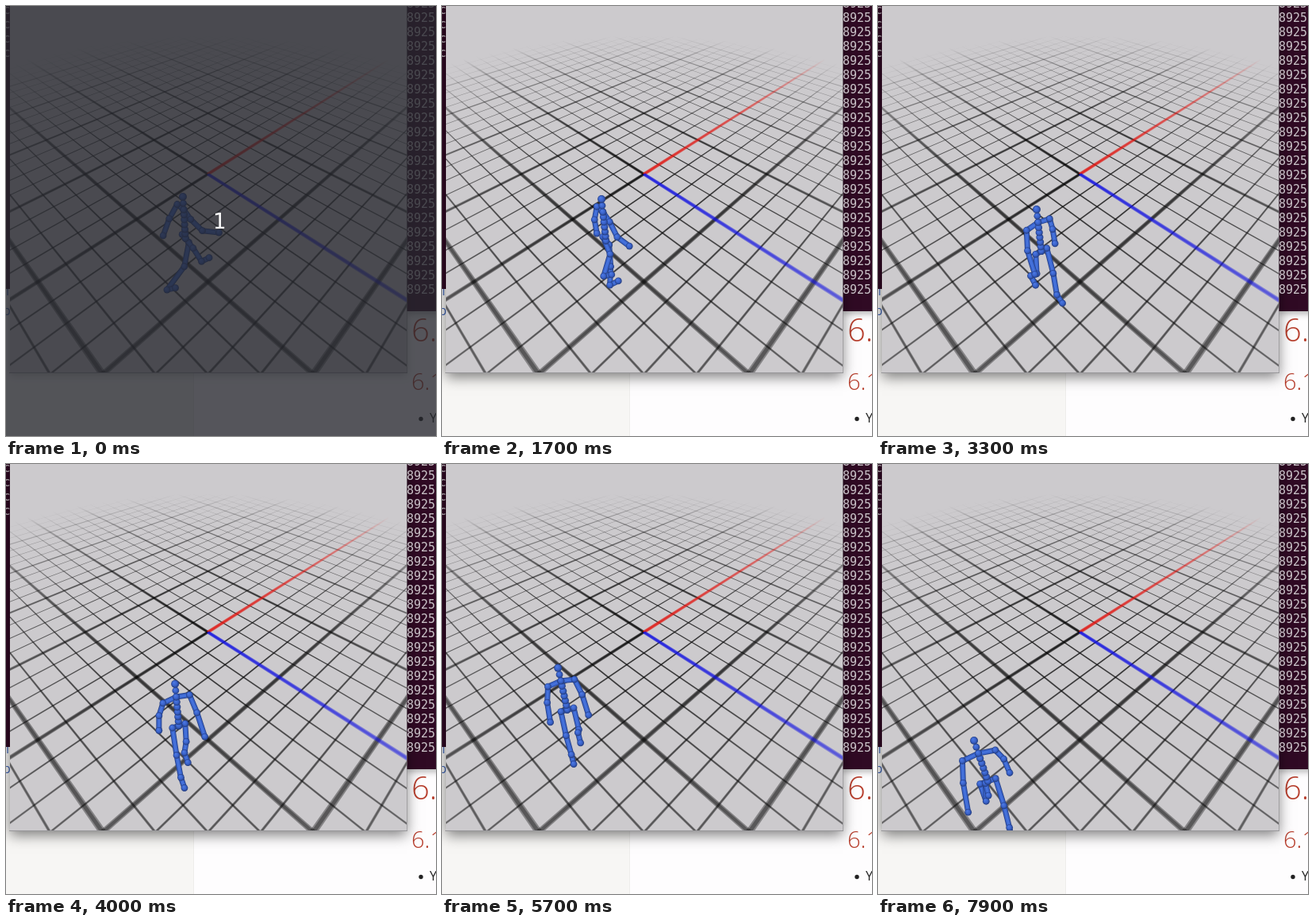
Write an HTML page with a canvas that moves like this. It is 542 px wide and 541 px high and loops after 8000 ms.

```html
<!DOCTYPE html>
<html>
<head>
<meta charset="utf-8">
<title>Walking skeleton viewer</title>
<style>
html, body { margin: 0; width: 100%; height: 100%; overflow: hidden; }
canvas { display: block; }
</style>
</head>
<body>
<canvas id="stage" width="542" height="541"></canvas>
<script>
const W = 542, H = 541, LOOP = 8000, STEP = 100;
const { PI, sin, cos, hypot, max, min, sqrt, SQRT2 } = Math;
const ctx = document.getElementById('stage').getContext('2d');

// World: s to the right, d towards the viewer, h up from the floor.
function project(s, d, h = 0) {
  const k = 1 / (7.19 - d - 1.154 * h);
  return [254.5 + 556 * s * k, 211.5 + (351.6 * d - 609 * h) * k];
}

// Floor axes run diagonally: u to the lower left, v to the lower right.
const floorPoint = (u, v) => project(v - u, u + v);

function floorLine(g, alongV, c, from, to, width, rgb) {
  const reach = sqrt(max(0, 25 - c * c));
  from = max(from, -reach);
  to = min(to, reach, 3.8 - c);
  if (to <= from) return;
  const at = (t, shift) => alongV ? floorPoint(c + shift, t) : floorPoint(t, c + shift);
  const a = at(from, 0), b = at(to, 0);
  const distance = p => hypot(p[0] - a[0], p[1] - a[1]);
  // A wide faint band under a narrow one gives the line its soft edge.
  for (const spread of [1.4, .8]) {
    const fade = g.createLinearGradient(...a, ...b);
    for (let i = 0; i <= 16; i++) {
      const t = from + (to - from) * i / 16;
      const alpha = .65 * max(0, 1 - hypot(c, t) / 5);
      fade.addColorStop(min(1, distance(at(t, 0)) / distance(b)), `rgba(${rgb},${alpha})`);
    }
    const half = width * spread / 2;
    g.fillStyle = fade;
    g.beginPath();
    [at(from, -half), at(to, -half), at(to, half), at(from, half)].forEach(p => g.lineTo(...p));
    g.fill();
  }
}

function drawFloor(g) {
  for (const major of [false, true]) {
    for (let i = -20; i <= 20; i++) {
      if (i === 0 || (i % 4 === 0) !== major) continue;
      for (const alongV of [true, false]) {
        floorLine(g, alongV, i / 4, -5, 5, major ? .03 : .012, '10,10,10');
      }
    }
  }
  floorLine(g, false, 0, 0, 5, .03, '0,0,0');
  floorLine(g, true, 0, -5, 0, .03, '0,0,0');
  floorLine(g, false, 0, -5, 0, .034, '225,20,15');
  floorLine(g, true, 0, 0, 5, .034, '15,15,225');
}

function label(g, text, x, y, font, color) {
  g.font = font;
  g.fillStyle = color;
  g.fillText(text, x, y);
}

function box(g, x, y, w, h, color) {
  g.fillStyle = color;
  g.fillRect(x, y, w, h);
}

function shadowed(g, blur, drop, alpha, draw) {
  g.save();
  g.shadowColor = `rgba(0,0,0,${alpha})`;
  g.shadowBlur = blur;
  g.shadowOffsetY = drop;
  draw();
  g.restore();
}

function clipToView(g, draw) {
  g.save();
  g.beginPath();
  g.rect(5, 0, 500, 461);
  g.clip();
  draw();
  g.restore();
}

function makeScene(focused) {
  const canvas = document.createElement('canvas');
  canvas.width = W;
  canvas.height = H;
  const g = canvas.getContext('2d');
  const mono = '15px "DejaVu Sans Mono", monospace', sans = '"Open Sans", sans-serif';
  const purple = '#300a24', pale = '#c9c2c7', red = '#b8402f', blue = '#3c62b4';
  box(g, 0, 0, W, H, '#fefdfe');
  box(g, 0, 356, 236, 185, '#f7f6f4');
  box(g, 236, 356, 1, 185, '#eeedeb');
  label(g, 'l', 0, 364, '16px ' + sans, blue);
  label(g, 'p', -4, 389, '16px ' + sans, blue);
  label(g, '6.', 511, 422, '300 40px ' + sans, red);
  label(g, '6.1', 511, 483, '300 29px ' + sans, red);
  label(g, 'Y', 534, 524, '16px ' + sans, '#222');
  g.beginPath();
  g.arc(523, 519.5, 2.7, 0, 7);
  g.fill();

  box(g, 0, 0, 6, 356, purple);
  shadowed(g, 8, 3, .3, () => box(g, 504, 0, 60, 384, purple));
  for (let i = 0; i < 4; i++) label(g, 'c', -3.5, 10 + 18 * i, mono, pale);
  if (focused) shadowed(g, 16, 6, .5, () => box(g, 5, -20, 500, 481, '#000'));
  else shadowed(g, 10, 3, .25, () => box(g, 5, -20, 500, 481, '#000'));
  for (let i = 0; i <= 20; i++) label(g, '8925', 505, 2 + 18 * i, mono, pale);

  clipToView(g, () => {
    box(g, 0, 0, W, H, '#cccacd');
    drawFloor(g);
  });
  box(g, 4, 461, 502, 1, '#98979a');
  box(g, 505, 0, 1, 461, 'rgba(140,138,142,.6)');
  return canvas;
}

// Each walk passes (s, d) at time `at`, facing `dir`; speeds and turns are per second.
const across = { dir: -.61, turn: 0, speed: .53 };
const walks = [
  { until: 1000, at: 0, s: -.235, d: 1.964, phase: 0, ...across },
  { until: 2600, at: 1700, s: -.395, d: 1.996, phase: .81, ...across },
  { until: 5600, at: 3300, s: -.39, d: 2.131, phase: .1, dir: .95, turn: .333, speed: .322 },
  { until: 6700, at: 6500, s: -.67, d: 2.402, phase: .1, dir: 1.2, turn: 0, speed: .355 },
  { until: LOOP, at: 7900, s: -.774, d: 2.88, phase: .17, dir: 1.2, turn: 0, speed: .55 }
];
const STRIDE = 2.1;

// Two limb bones swung forward from a joint: [forward, height] of the middle and the end.
function limb(height, upper, lower, swing, bend) {
  const mid = [upper * sin(swing), height - upper * cos(swing)];
  return [mid, [mid[0] + lower * sin(swing + bend), mid[1] - lower * cos(swing + bend)]];
}

function skeletonAt(t) {
  const walk = walks.find(w => t < w.until);
  const dt = (t - walk.at) / 1000;
  const facing = walk.dir + walk.turn * dt, course = walk.dir + walk.turn * dt / 2;
  const s = walk.s + walk.speed * dt * cos(course);
  const d = walk.d + walk.speed * dt * sin(course);
  const gain = min(1, walk.speed / across.speed);
  const place = (forward, left, h) => project(
    s + SQRT2 * (forward * cos(facing) + left * sin(facing)),
    d + SQRT2 * (forward * sin(facing) - left * cos(facing)), h);

  const limbs = [-1, 1].map(hand => {
    const angle = 2 * PI * (walk.phase + dt / STRIDE + (hand < 0 ? .5 : 0));
    const reach = gain * cos(angle), lift = gain * max(0, -sin(angle + .6));
    const [knee, ankle] = limb(.52, .25, .24, .08 + .3 * reach, -.06 - .85 * lift);
    const [elbow, wrist] = limb(.8, .15, .17, .05 - .45 * reach, .25 - .2 * reach);
    const toePitch = .7 * lift;
    const hip = .046 * hand, shoulder = .088 * hand;
    return {
      leg: [place(0, 0, .52), place(0, hip, .52), place(knee[0], hip * 1.1, knee[1]),
        place(ankle[0], hip, ankle[1]),
        place(ankle[0] + .08 * cos(toePitch), hip, ankle[1] - .01 - .08 * sin(toePitch))],
      arm: [place(0, 0, .82), place(0, shoulder, .8), place(elbow[0], shoulder * 1.35, elbow[1]),
        place(wrist[0], shoulder * 1.5, wrist[1])]
    };
  });
  const spine = Array.from({ length: 7 }, (_, i) => place(0, 0, .52 + .05 * i));
  return { limbs, spine, neck: place(0, 0, .88), head: place(0, 0, .94) };
}

function ball([x, y], r) {
  const shade = ctx.createRadialGradient(x - r * .3, y - r * .4, 0, x, y, r);
  shade.addColorStop(0, '#4f7ce6');
  shade.addColorStop(.6, '#3962ca');
  shade.addColorStop(1, '#233b7c');
  ctx.fillStyle = shade;
  ctx.beginPath();
  ctx.arc(x, y, r, 0, 7);
  ctx.fill();
}

function bone(a, b) {
  for (const [width, color] of [[7, '#27428a'], [5.2, '#3a64cc'], [2.2, '#4673dc']]) {
    ctx.lineWidth = width;
    ctx.strokeStyle = color;
    ctx.beginPath();
    ctx.moveTo(...a);
    ctx.lineTo(...b);
    ctx.stroke();
  }
}

function chain(points) {
  points.slice(1).forEach((p, i) => bone(points[i], p));
  points.forEach(p => ball(p, 4.4));
}

function drawFigure({ limbs, spine, neck, head }) {
  ctx.lineCap = 'round';
  for (const { leg } of limbs) chain(leg);
  for (const { arm } of limbs) chain(arm);
  spine.forEach(p => ball(p, 4.6));
  ball(neck, 4.4);
  ball(head, 5);
}

const scenes = [makeScene(false), makeScene(true)];

function frame(now) {
  const t = Math.floor(now % LOOP / STEP) * STEP;
  ctx.drawImage(scenes[t < 600 ? 0 : 1], 0, 0);
  clipToView(ctx, () => drawFigure(skeletonAt(t)));
  if (t < 100) {
    box(ctx, 0, 0, W, H, 'rgba(38,39,45,.78)');
    label(ctx, '1', 261, 280, '26px "DejaVu Sans", sans-serif', '#fff');
  }
  requestAnimationFrame(frame);
}

requestAnimationFrame(frame);
</script>
</body>
</html>
```
